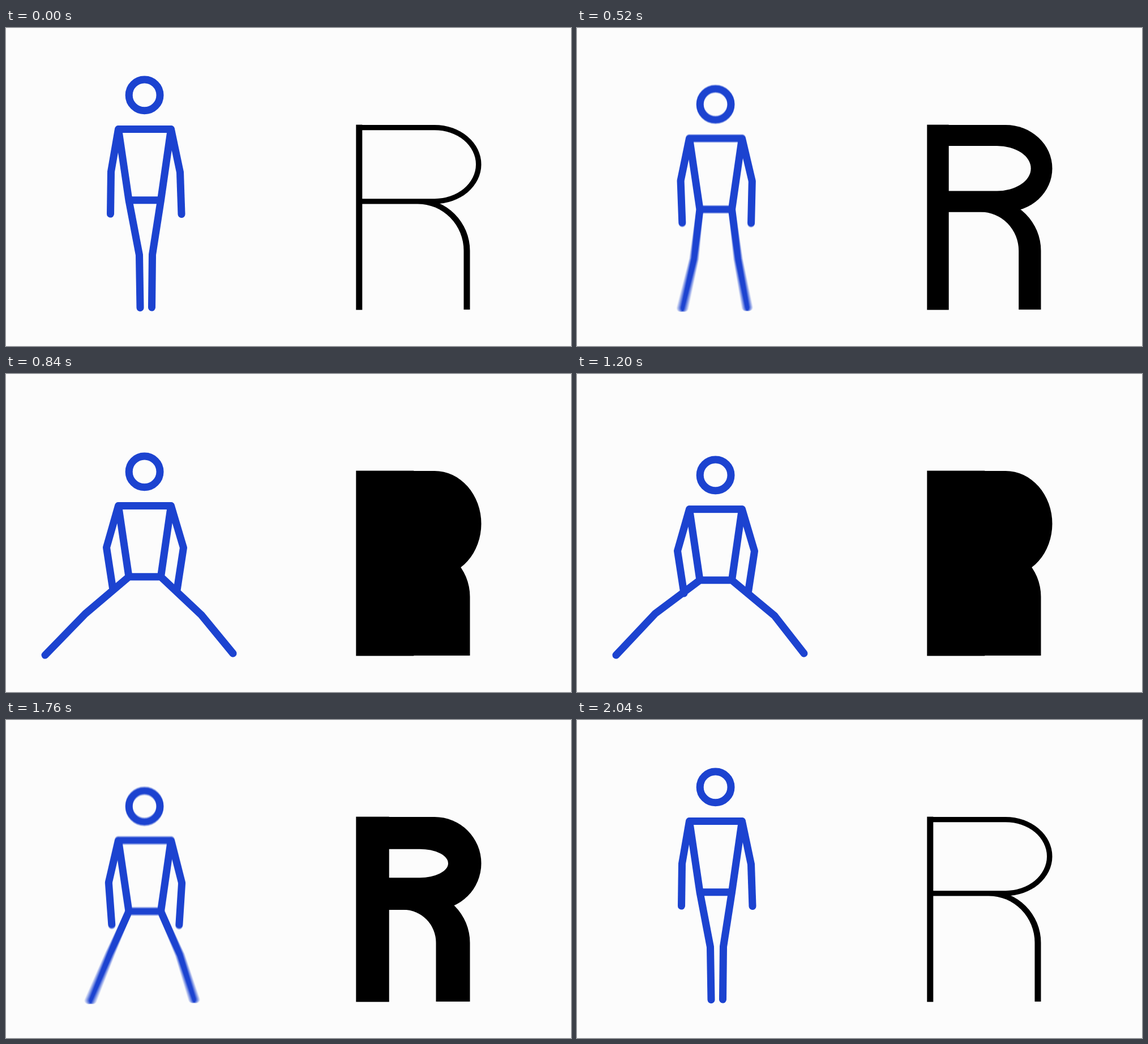
An HTML page with a canvas that plays this animation: 998x561 px, repeating every 2200 ms.

```html
<!DOCTYPE html>
<html lang="en">
<head>
<meta charset="utf-8">
<title>Weight and stance</title>
<style>
  html, body { margin: 0; width: 100%; height: 100%; overflow: hidden; background: #fcfcfc; }
  canvas { position: absolute; left: 0; top: 0; }
</style>
</head>
<body>
<canvas id="letter" width="998" height="561"></canvas>
<canvas id="figure" width="998" height="561"></canvas>
<script>
const W = 998, H = 561, PAPER = '#fcfcfc', INK = '#000', BLUE = '#1c43d0';
const LOOP = 2200, STEP = 40, SHUTTER = 20, SAMPLES = 10;
const letter = document.getElementById('letter').getContext('2d');
const figure = document.getElementById('figure').getContext('2d');

// Each pose: left and right elbow, hand, knee and foot, plus how far the body has dropped.
// Elbows and hands are measured before the drop.
const STAND = { drop: 0, elbows: [185.5, 253.5, 307.5, 254.5], hands: [184.5, 328, 310, 328.5],
                knees: [235.5, 400.5, 258.5, 400], feet: [237, 493.5, 257.5, 493] };
const SPLIT = { drop: 54, elbows: [177.5, 252, 313.5, 252.5], hands: [189, 327, 302, 327.5],
                knees: [140, 423, 345, 425], feet: [69, 496, 401, 493] };
const LOW = { ...SPLIT, drop: 65, knees: [136.7, 422.3, 352, 427.5] };

const PHASES = [
  { start: 338, end: 838, from: STAND, to: SPLIT, weight: [0, 1] },
  { start: 838, end: 1518, from: SPLIT, to: LOW, weight: [1, 1] },
  { start: 1518, end: 2016, from: LOW, to: STAND, weight: [1, 0] },
];

const mix = (a, b, k) => Array.isArray(a) ? a.map((v, i) => mix(v, b[i], k)) : a + (b - a) * k;

function stateAt(t) {
  const phase = PHASES.find(p => t < p.end) || PHASES[2];
  const s = Math.min(1, Math.max(0, (t - phase.start) / (phase.end - phase.start)));
  const k = s * s * (3 - 2 * s);
  const pose = {};
  for (const key in STAND) pose[key] = mix(phase.from[key], phase.to[key], k);
  return { pose, weight: mix(...phase.weight, k) };
}

// Block with a straight left part and an elliptical right end; "foot" continues it straight down.
function block(color, left, top, cx, cy, rx, ry, foot) {
  letter.fillStyle = color;
  letter.beginPath();
  letter.moveTo(left, top);
  letter.lineTo(cx, top);
  letter.ellipse(cx, cy, rx, ry, 0, -Math.PI / 2, foot ? 0 : Math.PI / 2);
  if (foot) letter.lineTo(cx + rx, foot);
  letter.lineTo(left, foot || cy + ry);
  letter.fill();
}

function drawLetter(w) {
  const stem = 11 + 91 * w;
  const stemRight = 618.3 + stem;
  const bowlHeight = 139.3 + 47 * w;
  const bowlBottom = 171 + bowlHeight;
  const middle = 171 + bowlHeight / 2;
  const holeHeight = 121 - 141 * w + 11 * w * w;

  letter.fillStyle = PAPER;
  letter.fillRect(0, 0, W, H);

  block(INK, 619, 301, 727, 393, 92.5, 92, 496.7);
  const innerX = 808.5 - 94 * w, innerStart = 727 - 48 * w;
  if (innerX > stemRight) {
    block(PAPER, stemRight - 1, bowlBottom, innerStart, 393, innerX - innerStart, 393 - bowlBottom, 500);
  }
  block(INK, 619, 171, 757, middle, 82.5, bowlHeight / 2);
  if (holeHeight > 0) {
    block(PAPER, stemRight - 1, middle - holeHeight / 2, 757 - 50 * w, middle, 73 - 44 * w, holeHeight / 2);
  }
  letter.fillStyle = INK;
  letter.fillRect(618.3, 170.6, stem, 326.7);
}

function figurePath({ drop, elbows, hands, knees, feet }) {
  const path = new Path2D();
  const line = (...points) => points.forEach(([x, y], i) => i ? path.lineTo(x, y) : path.moveTo(x, y));
  const shoulders = [[198.5, 178.5 + drop], [291.5, 178.5 + drop]];
  const hips = [[217, 303.7 + drop], [273.5, 303.7 + drop]];
  const joint = (pair, side, dy = 0) => [pair[side * 2], pair[side * 2 + 1] + dy];

  path.arc(244.6, 118.4 + drop, 27.4, 0, Math.PI * 2);
  line(...shoulders);
  line(...hips);
  for (const side of [0, 1]) {
    line(shoulders[side], joint(elbows, side, drop), joint(hands, side, drop));
    line(shoulders[side], hips[side], joint(knees, side), joint(feet, side));
  }
  return path;
}

// Averages several moments of the open shutter for motion blur, then tints the result.
function drawFigure(t) {
  figure.globalCompositeOperation = 'source-over';
  figure.clearRect(0, 0, W, H);
  figure.globalCompositeOperation = 'lighter';
  figure.globalAlpha = 1 / SAMPLES;
  figure.lineWidth = 13;
  figure.lineCap = figure.lineJoin = 'round';
  for (let i = 0; i < SAMPLES; i++) {
    const moment = t + SHUTTER * ((i + 0.5) / SAMPLES - 0.5);
    figure.stroke(figurePath(stateAt(moment).pose));
  }
  figure.globalAlpha = 1;
  figure.globalCompositeOperation = 'source-in';
  figure.fillStyle = BLUE;
  figure.fillRect(0, 0, W, H);
}

const began = performance.now();
function frame() {
  const elapsed = (performance.now() - began) % LOOP;
  const t = Math.floor(elapsed / STEP) * STEP;
  drawLetter(stateAt(t).weight);
  drawFigure(t);
  requestAnimationFrame(frame);
}
frame();
</script>
</body>
</html>
```
